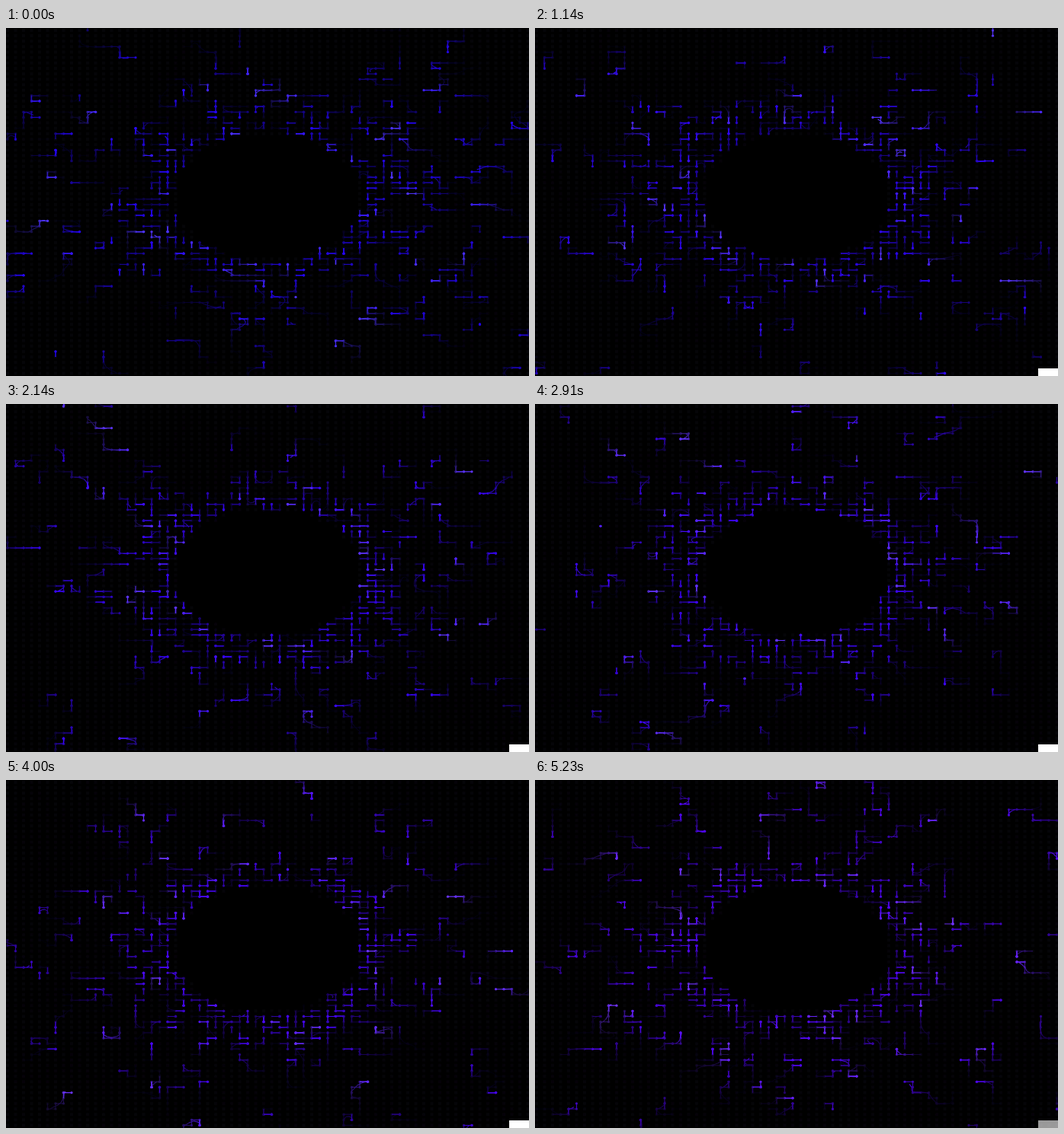
Write an HTML page with a canvas that moves like this. It is 686 px wide and 457 px high and loops after 5.3 s.

```html
<!DOCTYPE html>
<html lang="en">
<head>
<meta charset="utf-8">
<title>Grid sparks</title>
<style>
  html, body { margin: 0; width: 100%; height: 100%; overflow: hidden; background: #000; }
  canvas { display: block; }
  #corner { position: absolute; left: 660px; top: 447px; width: 26px; height: 10px; background: #fff; }
</style>
</head>
<body>
<canvas id="stage" width="686" height="457"></canvas>
<div id="corner"></div>
<script>
const LOOP = 5300, FRAME = 76.9, LAST_FRAME = 68, STEPS_PER_FRAME = 4.6;
const SIZE = 82, CENTER = 40.5, RING = 12.5;
const MAX_POP = 260, WARM_UP = 400, HISTORY = 45, FADE = 0.15;
const TOTAL = Math.round(LAST_FRAME * STEPS_PER_FRAME);

const canvas = document.getElementById('stage');
const corner = document.getElementById('corner');
const ctx = canvas.getContext('2d');

const toX = i => 2 + 10.5 * (i - 8);
const toY = j => 3 + 7.15 * (j - 10);

function seeded(a) {
  return () => {
    a = (a + 0x6D2B79F5) | 0;
    let t = Math.imul(a ^ (a >>> 15), 1 | a);
    t = (t + Math.imul(t ^ (t >>> 7), 61 | t)) ^ t;
    return ((t ^ (t >>> 14)) >>> 0) / 4294967296;
  };
}
const random = seeded(2017);

const radius = (i, j) => Math.hypot(i - CENTER, j - CENTER);

// The field peaks on a ring: steep inside, gentle outside.
function field(i, j) {
  const r = radius(i, j);
  return r < RING ? 255 * r / RING : 255 - 4 * (r - RING);
}

const busySince = new Float64Array(SIZE * SIZE).fill(-1e6);

function birth() {
  const i = Math.floor(random() * SIZE), j = Math.floor(random() * SIZE);
  if (radius(i, j) < RING - 0.5) return null;
  return { i, j, oldI: i, oldJ: j, x: i, y: j, vx: 0, vy: 0, stuck: 0, lum: 20 + Math.floor(40 * random()) };
}

function hop(p, step) {
  const { i, j } = p;
  if (i < 1 || j < 1 || i > SIZE - 2 || j > SIZE - 2) { p.stuck++; return; }
  let best = -1e9, ni, nj;
  for (const [di, dj] of [[0, -1], [0, 1], [-1, 0], [1, 0]]) {
    const pull = field(i + di, j + dj) + 30 * random();
    if (pull > best) { best = pull; ni = i + di; nj = j + dj; }
  }
  const spot = ni * SIZE + nj;
  if (step - busySince[spot] <= 15) { p.stuck++; return; }
  busySince[spot] = step;
  p.stuck = 0;
  p.oldI = i; p.oldJ = j;
  p.i = ni; p.j = nj;
}

// Each spark is pulled by a spring toward its current grid spot.
function follow(p) {
  p.vx = 0.4 * (p.vx - 8 * (p.x - p.i));
  p.vy = 0.4 * (p.vy - 8 * (p.y - p.j));
  p.x += 0.1 * p.vx;
  p.y += 0.1 * p.vy;
}

function simulate() {
  const log = [];
  let sparks = [];
  for (let step = -WARM_UP; step <= TOTAL; step++) {
    for (let n = 0; n < 2 && sparks.length < MAX_POP; n++) {
      const p = birth();
      if (p) sparks.push(p);
    }
    const marks = [];
    for (const p of sparks) {
      const lastX = p.x, lastY = p.y;
      if (random() < 0.5) hop(p, step);
      follow(p);
      marks.push({
        lum: p.lum,
        x0: toX(lastX), y0: toY(lastY), x1: toX(p.x), y1: toY(p.y),
        ax: toX(p.oldI), ay: toY(p.oldJ), bx: toX(p.i), by: toY(p.j)
      });
    }
    sparks = sparks.filter(p => p.stuck < 10);
    if (step >= -HISTORY) log.push(marks);
  }
  return log;
}

// Barely visible spots outside the ring.
function makeBase() {
  const base = document.createElement('canvas');
  base.width = canvas.width;
  base.height = canvas.height;
  const g = base.getContext('2d');
  g.fillStyle = '#000';
  g.fillRect(0, 0, base.width, base.height);
  g.fillStyle = '#050508';
  for (let i = 8; i < 74; i++) {
    for (let j = 10; j < 74; j++) {
      if (radius(i, j) > RING - 1) g.fillRect(toX(i) - 2, toY(j) - 2, 4, 4);
    }
  }
  return base;
}

const log = simulate();
const base = makeBase();
ctx.lineWidth = 1.15;

function drawStep(step) {
  ctx.globalAlpha = FADE;
  ctx.drawImage(base, 0, 0);
  ctx.globalAlpha = 1;
  const hue = 248 + step / 29;
  for (const m of log[step + HISTORY]) {
    if (m.bx < -12 || m.bx > 698 || m.by < -9 || m.by > 466) continue;
    ctx.strokeStyle = ctx.fillStyle = `hsl(${hue}, 95%, ${m.lum}%)`;
    ctx.beginPath();
    ctx.moveTo(m.x0, m.y0);
    ctx.lineTo(m.x1, m.y1);
    ctx.moveTo(m.ax, m.ay);
    ctx.lineTo(m.bx, m.by);
    ctx.stroke();
    ctx.beginPath();
    ctx.arc(m.bx, m.by, 1.6, 0, 2 * Math.PI);
    ctx.fill();
  }
}

let drawn = null;

function show(frame) {
  const step = Math.round(frame * STEPS_PER_FRAME);
  if (step === drawn) return;
  let from = drawn + 1;
  if (drawn === null || step < drawn || step - drawn > HISTORY) {
    ctx.drawImage(base, 0, 0);
    from = step - HISTORY;
  }
  for (let s = from; s <= step; s++) drawStep(s);
  drawn = step;
  corner.style.opacity = Math.min(1, 0.6 * frame, 0.6 * (LAST_FRAME + 1 - frame));
}

function tick() {
  const t = performance.now() % LOOP;
  show(Math.min(LAST_FRAME, Math.floor((t + 14) / FRAME)));
  requestAnimationFrame(tick);
}
tick();
</script>
</body>
</html>
```
